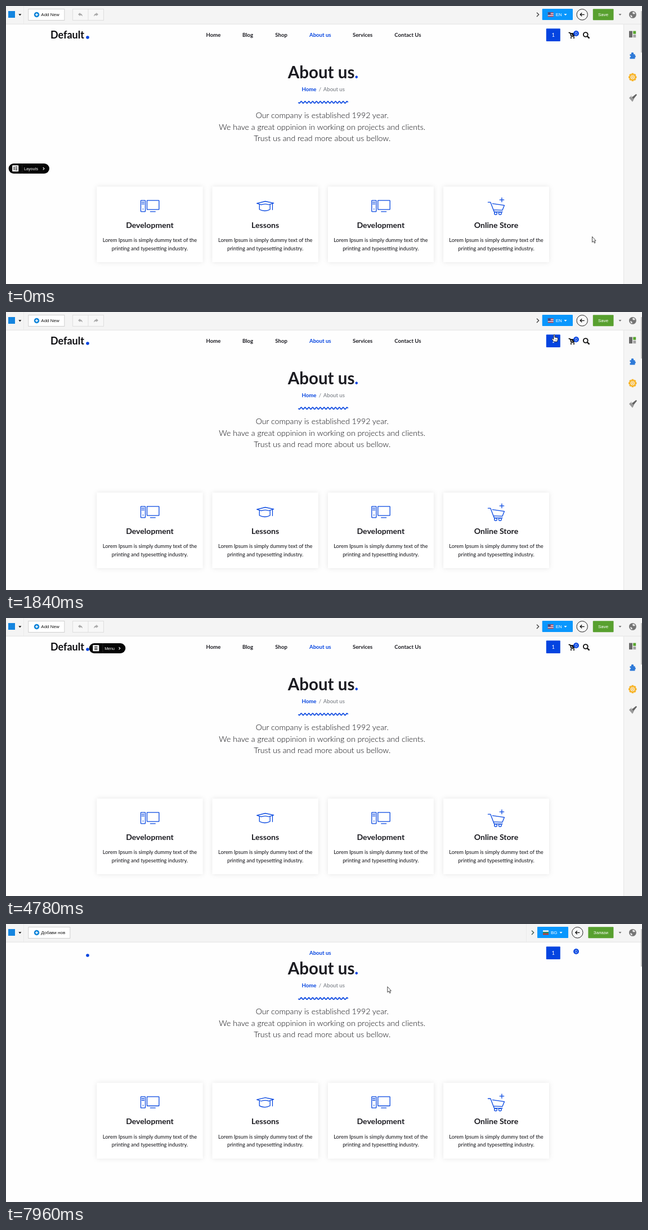
These frames come from a looping animation (1130 px wide and 496 px high, 8000 ms). An HTML page:

```html
<!DOCTYPE html>
<html lang="en">
<head>
<meta charset="utf-8">
<title>About us</title>
<style>
html, body { margin: 0; width: 100%; height: 100%; overflow: hidden; background: #fefefe; }
svg { display: block; width: 1130px; height: 496px; }
.lato { font-family: Lato, sans-serif; }
.ui { font-family: "Liberation Sans", Arial, sans-serif; }
.b { font-weight: 700; }
.light { font-weight: 300; }
.mid { text-anchor: middle; }
.line { fill: none; stroke: #0747e0; stroke-width: 1.3; stroke-linejoin: round; stroke-linecap: round; }
</style>
</head>
<body>
<svg id="stage" viewBox="0 0 1130 496" xmlns="http://www.w3.org/2000/svg"></svg>
<script>
const LOOP = 8000;
const BLUE = '#0444e0', INK = '#1c1c22';

const rect = (x, y, w, h, fill, more = '') =>
  `<rect x="${x}" y="${y}" width="${w}" height="${h}" fill="${fill}" ${more}/>`;
const circle = (x, y, r, fill, more = '') =>
  `<circle cx="${x}" cy="${y}" r="${r}" fill="${fill}" ${more}/>`;
const path = (d, fill, more = '') => `<path d="${d}" fill="${fill}" ${more}/>`;
const text = (x, y, size, cls, fill, str) =>
  `<text x="${x}" y="${y}" font-size="${size}" class="${cls}" fill="${fill}">${str}</text>`;
const group = (id, body, more = '') => `<g id="${id}" ${more}>${body}</g>`;
const at = (x, y, body) => `<g transform="translate(${x} ${y})">${body}</g>`;
const stroke = (color, width) => `stroke="${color}" stroke-width="${width}"`;
const caret = (x, y, color) => path(`M${x - 2.5} ${y - 1.3}h5l-2.5 3z`, color);

// Page icons, drawn from their top left corner
const computer = `<g class="line"><rect x=".6" y=".6" width="8" height="20" rx=".6"/>
  <path d="M2.5 4h4M2.5 7h4M4.6 15.6v1"/><rect x="11.6" y=".6" width="21.4" height="16.4" rx=".6"/>
  <path d="M17.5 20.6h9"/></g>`;
const cap = `<g class="line"><path d="M1 4.6L16 1L31 4.2L22 7Q16 4.6 9 7.2Z"/>
  <path d="M5.6 6.5V15.5Q15.5 20.5 24.5 15.5V6.5M28.8 5V16"/></g>`;
const trolley = `<g class="line"><path d="M1 8.6H5.4L12 25.8H26.6M9 11L30 14L26.4 22.8L10.6 22"/>
  <circle cx="14.6" cy="28.4" r="2.4"/><circle cx="22.4" cy="28.4" r="2.4"/>
  <path d="M25.5 .6v7.4M21.8 4.3h7.4"/></g>`;

function card(i, title, icon, ix, iy) {
  const x = 161.7 + i * 205.15, c = x + 93.8;
  return rect(x, 322.5, 187.7, 134.5, '#fff', 'filter="url(#soft)"') +
    at(c + ix, iy, icon) +
    text(c, 395.8, 14.1, 'lato b mid', INK, title) +
    text(c, 421.3, 9.34, 'lato mid', '#101015', 'Lorem Ipsum is simply dummy text of the') +
    text(c, 435.6, 9.34, 'lato mid', '#101015', 'printing and typesetting industry.');
}

function wave() {
  const n = 13, step = 88 / n / 2;
  let d = 'M519.5 171.8';
  for (let i = 0; i < n * 2; i++) d += `q${step / 2} ${i % 2 ? -3.2 : 3.2} ${step} 0`;
  return path(d, 'none', stroke(BLUE, 1.8));
}

const intro = ['Our company is established 1992 year.',
  'We have a great oppinion in working on projects and clients.',
  'Trust us and read more about us bellow.'];

const content =
  `<text x="563.6" y="129" font-size="29.5" class="lato b mid" fill="${INK}">About us<tspan fill="${BLUE}">.</tspan></text>` +
  text(525.5, 152, 9.6, 'lato b', BLUE, 'Home') +
  text(555.7, 152, 9.6, 'lato', '#6b7078', '/') +
  text(563.8, 152, 9.6, 'lato', '#6b7078', 'About us') +
  wave() +
  intro.map((s, i) => text(561.7, 200.2 + i * 20.5, 14.15, 'lato light mid', '#08080c', s)).join('') +
  card(0, 'Development', computer, -16.6, 346.2) +
  card(1, 'Lessons', cap, -16, 347.5) +
  card(2, 'Development', computer, -16.6, 346.2) +
  card(3, 'Online Store', trolley, -15.5, 341.6) +
  text(563, 577.5, 27.8, 'lato b mid', INK, 'Our Projects Gallery');

const links = [[355.5, 'Home'], [420, 'Blog'], [478.3, 'Shop'], [616, 'Services'], [690.3, 'Contact Us']];
const navDark = text(79, 57.6, 18, 'lato b', '#0c0c10', 'Default') +
  links.map(([x, s]) => text(x, 55, 9.6, 'lato b', INK, s)).join('') +
  at(999, 46, path('M.5 1.5H3L5 8H11M3.5 2.8H11.8L10.6 6.8L5 7.2Z', '#111', stroke('#111', 1.3)) +
    circle(5, 10.8, 1.2, '#111') + circle(10, 10.8, 1.2, '#111')) +
  circle(1029.8, 51, 3.9, 'none', stroke('#111', 1.9)) +
  path('M1032.8 54L1036.5 57.7', 'none', stroke('#111', 2.4));
const navBlue = circle(145, 56, 2.8, BLUE) +
  text(539, 55, 9.6, 'lato b', BLUE, 'About us') +
  rect(959.8, 40.3, 25, 22.6, BLUE, 'rx="1"') +
  text(972.2, 55, 9.6, 'lato mid', '#fff', '1') +
  circle(1013, 49, 4.9, BLUE) + text(1013, 51.5, 7, 'lato mid', '#fff', '0');

// Top toolbar
const addIcon = circle(54.5, 15.5, 4.7, '#0b83d9') + path('M52 15.5h5M54.5 13v5', 'none', stroke('#fff', 1.3));
const addButton = (w, label) => rect(39.8, 5.5, w, 20, '#fff', stroke('#cfcfcf', 1)) + addIcon +
  text(62.3, 18.4, 8, 'ui', '#111', label);
const bent = 'M0 -.6L3.6 -3.8V-1.9Q7.5 -1.9 8 3Q6.5 .7 3.6 .7V2.6Z';
const undo = rect(118.5, 5.5, 55, 20, '#f7f7f7', stroke('#dedede', 1)) + path('M146 5.5v20', 'none', stroke('#dedede', 1)) +
  at(128, 15.5, path(bent, '#a9a9a9')) + `<g transform="translate(164 15.5) scale(-1 1)">${path(bent, '#a9a9a9')}</g>`;
const flag = (stripes, extra) => stripes.map((c, i) =>
  rect(0, i * 8 / stripes.length, 10, 8 / stripes.length, c)).join('') + extra;
const flagEn = flag(['#c9404a', '#e9dcde', '#c9404a', '#e9dcde', '#c9404a'], rect(0, 0, 5, 4.6, '#3f4c86'));
const flagBg = flag(['#f4f4f4', '#2d8a62', '#c23a2e'], '');
const arrowBack = (x) => circle(x, 15.3, 9.7, '#f8f8f8', stroke('#222', 1)) +
  path(`M${x + 4} 15.3h-7.5m3 -3l-3 3l3 3`, 'none', stroke('#111', 1.3));
const language = (x, w, code, pic, id) => group(id,
  rect(x, 5, w, 20, '#0a97fd', 'rx="1"') + at(x + 10, 11.3, pic) +
  text(x + 24, 18.2, 8, 'ui', '#fff', code) + caret(x + w - 13, 15.3, '#fff'));
const save = (x, w, label) => rect(x, 5.3, w, 20, '#58a02f', 'rx="1"') +
  text(x + w / 2, 18.3, 8, 'ui mid', '#fff', label);
const chevron = (x, y, s, color, w) => path(`M${x - s / 2} ${y - s}l${s} ${s}l${-s} ${s}`, 'none', stroke(color, w));
const edge = (x) => path(`M${x} 0v32`, 'none', stroke('#ebebeb', 1));

const toolbar = rect(0, 0, 1130, 32.3, '#f4f4f4') + path('M0 32.3H1130', 'none', stroke('#e4e4e4', 1)) +
  edge(31.5) + rect(4, 9, 12, 12, '#1485df') + caret(24.8, 15.6, '#111') +
  caret(1091, 15.3, '#777') +
  circle(1113.4, 15.4, 6.4, '#757575') +
  path('M1113.5 10.5l3 .5l1.5 3l-3 .5l-2 -1.5zM1109 16l3 1l1 2.5l-1.5 .8q-2.5 -1.3 -2.5 -4.3z', '#e6e6e6');
const english = addButton(64, 'Add New') + undo + chevron(944.8, 15.3, 3.6, '#444', 1.4) +
  language(952.7, 54.3, 'EN', flagEn, 'lang') + arrowBack(1023.7) + save(1042.8, 36.7, 'Save');
const bulgarian = addButton(74, 'Добави нов') + edge(924.5) + chevron(935.8, 15.3, 3.6, '#3c5a50', 1.4) +
  language(944, 55, 'BG', flagBg, 'langBg') + arrowBack(1015.3) + save(1034.4, 45, 'Запази');

// Right sidebar
function gear() {
  let teeth = '';
  for (let i = 0; i < 8; i++) teeth += rect(1111.3, 119.8, 4, 4, '#f8b52a', `rx="1" transform="rotate(${i * 45} 1113.3 127)"`);
  return teeth + circle(1113.3, 127, 4.7, '#f4f4f4', stroke('#f8b52a', 2.2)) + circle(1113.3, 127, 1.8, '#fff', stroke('#f8b52a', 1.3));
}
const sidebar = rect(1097.5, 32.8, 33, 464, '#f5f5f5') + path('M1097.5 33V496', 'none', stroke('#e6e6e6', 1)) +
  rect(1107, 44.6, 6, 11.6, '#6a6a6a') + rect(1114.2, 44.6, 5, 5.2, '#57a52e') + rect(1114.2, 51, 5, 5.2, '#a3a3a3') +
  rect(1108.5, 86, 9, 8.3, '#2f7ad8', 'rx=".6"') + circle(1113, 85, 2.3, '#2f7ad8') +
  circle(1117.2, 90, 1.7, '#2f7ad8') + circle(1108.8, 90, 1.3, '#f5f5f5') + gear() +
  path('M1107 164l4 -4l5 6l-3 5z', '#9a9a9a') + path('M1109.5 160.5l7.5 6.5', 'none', stroke('#f5f5f5', 1)) +
  path('M1112 163l3 3l6 -7.5l-1.5 -1.5z', '#636363');

// Floating black pills
const pill = (w, icon, label, tip) => rect(0, 0, w, 18, '#050505', 'rx="9"') +
  rect(6.6, 3.3, 11, 11, '#fff', 'rx=".6"') + path(icon, 'none', stroke('#111', 1.3)) +
  path('M24.2 0v18', 'none', stroke('#333', .7)) +
  text(27.5, 11.5, 7.1, 'ui', '#fff', label) + chevron(tip, 9.2, 2.2, '#fff', 1.1);
const layouts = pill(72.4, 'M9.8 5.5v6.5M11.8 6.2h3.8M11.8 8.8h3.8M11.8 11.4h3.8', 'Layouts', 62.3);
const menu = pill(64.6, 'M9.3 6.2h5.6M9.3 8.8h5.6M9.3 11.4h5.6', 'Menu', 54);

const arrow = path('M0 0V10L2.3 8L4 11.6L5.5 10.9L4 7.4H6.6Z', '#fff', stroke('#333', .9));
const hand = path('M-1 1Q0 -.6 1 1V5L6 6Q7 6.5 6.5 9L5.3 13H-.6L-4 8.5Q-3.6 6.8 -2.4 7.5L-1 8.8Z', '#fff', stroke('#222', .9)) +
  path('M2 8.5v2M4 8.8v2', 'none', stroke('#333', .7));

const stage = document.getElementById('stage');
stage.innerHTML =
  `<defs><filter id="soft" x="-10%" y="-10%" width="120%" height="120%">
   <feDropShadow dx="0" dy="0" stdDeviation="4" flood-color="#000" flood-opacity=".1"/></filter></defs>` +
  rect(0, 0, 1130, 496, '#fefefe') + group('content', content) +
  group('nav', group('navDark', navDark) + navBlue) +
  group('sidebar', sidebar) +
  group('toolbar', toolbar + group('english', english) + group('bulgarian', bulgarian)) +
  rect(1128, 9, 2, 74, '#c4c4c4', 'id="thumb"') +
  group('layouts', layouts) + group('menu', menu, 'transform="translate(147.7 45)"') +
  group('arrow', arrow) + group('hand', hand);

const el = {};
stage.querySelectorAll('[id]').forEach((e) => { el[e.id] = e; });
const show = (id, on) => el[id].setAttribute('display', on ? 'inline' : 'none');
const move = (id, x, y) => el[id].setAttribute('transform', `translate(${x} ${y})`);

// Pointer stops: time, x, y
const stops = [
  [0, 1041.5, 411.5], [70, 1041.5, 411.5], [770, 1010, 90], [920, 1010, 90],
  [1210, 991, 8], [1300, 991, 8], [1680, 978, 14], [1720, 978, 14], [1840, 974, 40], [2120, 974, 40],
  [2220, 973, 53], [2370, 973, 53], [2450, 966, 68], [2600, 966, 68], [2840, 966, 72], [4140, 966, 72],
  [4240, 959, 65.5], [4450, 959, 65.5], [4470, 958, 65.5], [4780, 958, 65.5],
  [6720, 667.5, 42], [6950, 667.5, 42], [7260, 672, 115], [7470, 672, 115], [7640, 678, 112.5],
  [7800, 678, 112.5], [7810, 678, 112], [7950, 678, 112], [7960, 677.8, 111.8], [LOOP, 677.8, 111.8]];

function pointer(t) {
  const i = stops.findIndex((s) => s[0] > t);
  const [t0, x0, y0] = stops[i - 1], [t1, x1, y1] = stops[i];
  const p = (t - t0) / (t1 - t0), k = p * p * (3 - 2 * p);
  return [x0 + (x1 - x0) * k, y0 + (y1 - y0) * k];
}

function draw(t) {
  const [x, y] = pointer(t);
  const first = t < 6260, bare = !first && t < 6720;
  const seen = t < 4740 || t >= 6720;
  const onLang = first && x > 953 && x < 1007 && y < 25;
  const onBox = first && x > 960 && x < 985 && y >= 38 && y < 63;

  move('content', 0, first ? 0 : bare ? -71.2 : -38.7);
  move('nav', 0, bare ? -32.5 : 0);
  show('navDark', first);
  show('sidebar', first);
  show('toolbar', !bare);
  show('english', first);
  show('bulgarian', !first);
  el.lang.setAttribute('opacity', onLang ? .62 : 1);
  el.thumb.setAttribute('height', first ? 74 : t < 7000 ? 60 : 67);

  show('layouts', t < 4740 && (y > 71 || t > 2620));
  move('layouts', 4.6, y > 275 ? 281 : 76.5);
  show('menu', first && t >= 4740);

  const pointing = onLang || onBox;
  show('hand', seen && pointing);
  show('arrow', seen && !pointing);
  move(pointing ? 'hand' : 'arrow', x, y);
}

function tick(now) {
  draw(now % LOOP);
  requestAnimationFrame(tick);
}
draw(0);
requestAnimationFrame(tick);
</script>
</body>
</html>
```
